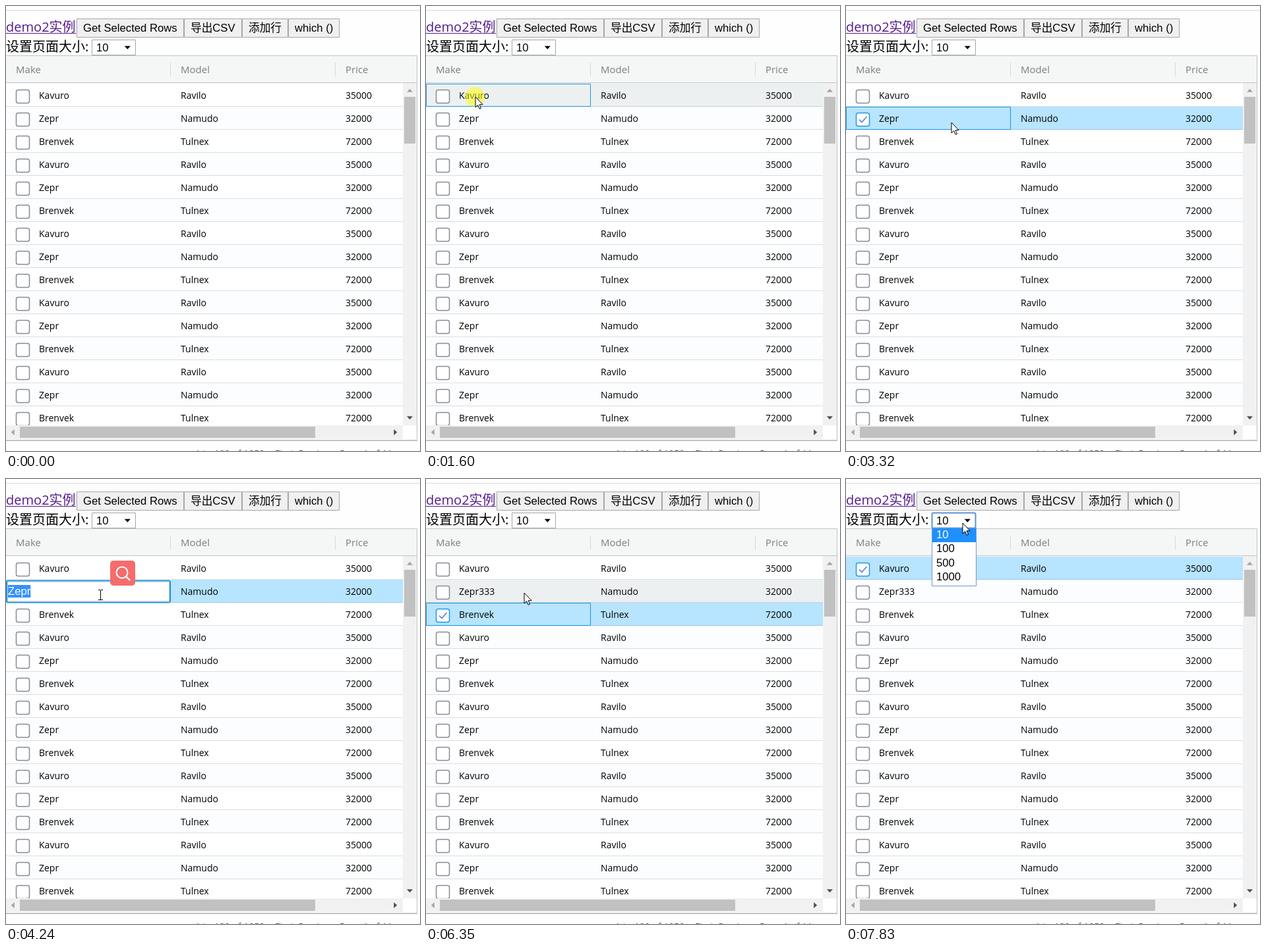
An HTML page with a canvas that plays this animation: 628x676 px, repeating every 8 s.

```html
<!DOCTYPE html>
<html lang="zh">
<head>
<meta charset="utf-8">
<title>Grid demo</title>
<style>
  html, body { margin: 0; width: 100%; height: 100%; overflow: hidden; background: #fefefe; }
  canvas { display: block; }
</style>
</head>
<body>
<canvas id="stage" width="628" height="676"></canvas>
<script>
const ctx = document.getElementById('stage').getContext('2d');
const LOOP = 8000, TICK = 77;
const TOP = 117, PITCH = 35, ROWS = 15, BODY_RIGHT = 602, BODY_BOTTOM = 637;
const GRID = '14px "Open Sans", "Noto Sans CJK SC", sans-serif';
const HEAD = '15px "Open Sans", sans-serif';
const PAGE = '20px "Open Sans", "Noto Sans CJK SC", sans-serif';
const FORM = '16.67px "Liberation Sans", "Noto Sans CJK SC", Arial, sans-serif';
const CARS = [['Kavuro', 'Ravilo', '35000'], ['Zepr', 'Namudo', '32000'], ['Brenvek', 'Tulnex', '72000']];
const COLUMNS = [50, 265, 515];
const BLUE = '#1b93dc', EDGE = '#bdc3c7', SELECTED = [183, 228, 255];
const ARROW = new Path2D('M.5.5V16.5L4.2 13L6.6 18.8L9 17.8L6.6 12.2H11.6Z');

const ENTRY = { x: 8, y: 619 };
const MOVES = [
  { from: 360, to: 1130, x: 15, y: 148, bend: 30 },
  { from: 1210, to: 1370, x: 75, y: 138 },
  { from: 1750, to: 1980, x: 81, y: 169 },
  { from: 2930, to: 3160, x: 160, y: 177 },
  { from: 4090, to: 4240, x: 144, y: 176 },
  { from: 5490, to: 5570, x: 194, y: 221 },
  { from: 6040, to: 6510, x: 119, y: 142 },
  { from: 6970, to: 7600, x: 177, y: 67, bend: 45 },
];
// a click without a row lands on the page size box
const CLICKS = [
  { down: 1600, up: 1680, row: 0 },
  { down: 2150, up: 2220, row: 1 },
  { down: 3240, up: 3320, row: 1 },
  { down: 3400, up: 3480, row: 1 },
  { down: 5660, up: 5810, row: 2 },
  { down: 6580, up: 6660, row: 0 },
  { down: 7750, up: 7830 },
];
const EDIT = { from: 3480, to: 5660 }, POPUP = { from: 3560, to: 4780 };
const DESELECT = 4700, FIRST_KEY = 5020, KEY_GAP = 190;

const clamp = (v, max) => Math.max(0, Math.min(max, v));
const lerp = (a, b, k) => a + (b - a) * k;
const within = (t, span) => t >= span.from && t < span.to;

function rect(x, y, w, h, color) {
  ctx.fillStyle = color;
  ctx.fillRect(x, y, w, h);
}
function rounded(x, y, w, h, radius, color) {
  ctx.fillStyle = color;
  ctx.beginPath();
  ctx.roundRect(x, y, w, h, radius);
  ctx.fill();
}
function frame(x, y, w, h, color, width = 1, radius = 0) {
  ctx.strokeStyle = color;
  ctx.lineWidth = width;
  ctx.beginPath();
  ctx.roundRect(x + .5, y + .5, w - 1, h - 1, radius);
  ctx.stroke();
}
function text(s, x, y, font, color = '#000') {
  ctx.font = font;
  ctx.fillStyle = color;
  ctx.fillText(s, x, y);
}
function line(points, color, width) {
  ctx.strokeStyle = color;
  ctx.lineWidth = width;
  ctx.beginPath();
  points.forEach(p => ctx.lineTo(...p));
  ctx.stroke();
}
function triangle(x, y, angle, color, size = 4.5) {
  ctx.save();
  ctx.translate(x, y);
  ctx.rotate(angle);
  ctx.fillStyle = color;
  ctx.beginPath();
  ctx.moveTo(-size, -size / 2);
  ctx.lineTo(size, -size / 2);
  ctx.lineTo(0, size / 2 + .5);
  ctx.fill();
  ctx.restore();
}

function pointerAt(t) {
  const i = MOVES.findLastIndex(m => t >= m.from);
  if (i < 0) return null;
  const start = i ? MOVES[i - 1] : ENTRY, { from, to, x, y, bend = 0 } = MOVES[i];
  const steps = Math.round((to - from) / TICK) + 1;
  const u = clamp((Math.floor((t - from) / (to - from) * (steps - 1) + 1e-6) + 1) / steps, 1);
  const k = u * u * (3 - 2 * u);
  return {
    x: Math.round(lerp(start.x, x, k) + bend * Math.sin(Math.PI * k)),
    y: Math.round(lerp(start.y, y, k)),
  };
}

function drawPage() {
  rect(0, 0, 628, 676, '#fefefe');
  rect(0, 6, 628, 1, '#dcdcdc');
  text('demo2实例', 0, 39, PAGE, '#551a8b');
  rect(0, 41, 106, 1, '#551a8b');
  text('设置页面大小:', 0, 69, PAGE);
  let x = 107;
  for (const label of ['Get Selected Rows', '导出CSV', '添加行', 'which ()']) {
    ctx.font = FORM;
    const w = Math.round(ctx.measureText(label).width + 20);
    rect(x, 19, w, 29, '#f0f0f0');
    frame(x, 19, w, 29, '#a6a6a6');
    text(label, x + 10, 39, FORM);
    x += w;
  }
  rect(0, 75, 624, 586, '#fff');
  rect(0, 75, 624, 41, '#f5f7f7');
  rect(0, 75, 624, 1, EDGE);
  rect(0, 116, 624, 1, EDGE);
  ['Make', 'Model', 'Price'].forEach((s, i) => {
    text(s, 15 + 250 * i, 102, HEAD, '#7b7f80');
    if (i) rect(250 * i - 1, 86, 1, 21, '#d5d9db');
  });
  text('1 to 100 of 1050', 287, 685, GRID, '#555');
  text('First  Previous  Page 1 of 11', 408, 685, GRID, '#555');
}

function drawScrollbars() {
  rect(602, 117, 21, 520, '#f1f1f1');
  rect(604, 138, 17, 71, '#c1c1c1');
  triangle(612.5, 128.5, Math.PI, '#a3a3a3');
  triangle(612.5, 625.5, 0, '#505050');
  rect(0, 637, 602, 21, '#f1f1f1');
  rect(21, 639, 448, 17, '#c1c1c1');
  triangle(10.5, 647.5, Math.PI / 2, '#a3a3a3');
  triangle(590.5, 647.5, -Math.PI / 2, '#505050');
  rect(0, 659, 624, 2, EDGE);
  rect(623, 75, 1, 586, EDGE);
}

function drawRows(t, pointer) {
  const [last, before] = CLICKS.filter(c => 'row' in c && t >= c.up).reverse();
  const fade = last ? clamp(.65 + (t - last.up) / 300, 1) : 1;
  const hovered = pointer ? Math.floor((pointer.y - TOP) / PITCH) : -1;
  ctx.save();
  ctx.beginPath();
  ctx.rect(0, TOP, BODY_RIGHT, BODY_BOTTOM - TOP);
  ctx.clip();
  for (let i = 0; i < ROWS; i++) {
    const y = TOP + PITCH * i, checked = last?.row === i;
    const plain = i === hovered ? [236, 240, 241] : i % 2 ? [252, 253, 254] : [255, 255, 255];
    const amount = lerp(+(before?.row === i), +checked, fade);
    rect(0, y + 1, BODY_RIGHT, PITCH, `rgb(${plain.map((v, c) => Math.round(lerp(v, SELECTED[c], amount)))})`);
    rect(0, y + PITCH, BODY_RIGHT, 1, 'rgba(0, 30, 45, .14)');

    rounded(15, y + 10, 21, 21, 3, '#fff');
    frame(15, y + 10, 21, 21, checked ? '#2196e8' : '#878b98', 1.5, 3);
    if (checked) line([[20, y + 20.5], [24, y + 24.5], [31.5, y + 16]], '#5580dc', 1.6);

    CARS[i % 3].forEach((cell, c) => {
      const edited = i === 1 && c === 0 && t >= EDIT.to;
      text(edited ? cell + '333' : cell, COLUMNS[c], y + (c ? 24 : 23.5), GRID);
    });
  }
  ctx.restore();

  const focus = CLICKS.findLast(c => t >= c.down)?.row;
  if (focus !== undefined && !within(t, EDIT)) frame(0, TOP + PITCH * focus + 1, 250, PITCH, BLUE);
}

function drawEditor(t) {
  const typed = CARS[1][0] + '3'.repeat(clamp(Math.floor((t - FIRST_KEY) / KEY_GAP) + 1, 3));
  const marked = t < DESELECT;
  rect(0, 153, 250, 35, '#fff');
  frame(.5, 154, 249, 34, BLUE, 2, 2);
  frame(2, 156, 246, 30, '#d4d8da');
  ctx.font = FORM;
  const width = ctx.measureText(typed).width;
  if (marked) rect(3, 161, width, 19, '#3390ff');
  text(typed, 3, 176, FORM, marked ? '#fff' : '#000');
  if (!marked) rect(Math.round(3 + width), 161, 1, 19, '#000');
}

function drawPopup() {
  rounded(158, 124, 38, 38, 5, '#f56c6c');
  frame(167, 133, 18, 18, '#fff', 2, 9);
  line([[182, 148], [188, 154]], '#fff', 2.4);
}

function drawSelect(t) {
  const { down, up } = CLICKS.at(-1);
  const focused = t >= down;
  rect(130, 51, 67, 24, '#fff');
  frame(130, 51, 67, 24, focused ? '#5b93d6' : '#a6a6a6', focused ? 2 : 1, focused ? 2 : 0);
  text('10', 137, 69, FORM);
  triangle(184.3, 63, 0, '#000');
  if (t < up) return;
  rect(130, 74, 68, 89, '#fff');
  rect(131, 75, 66, 21, '#1e90ff');
  frame(130, 74, 68, 89, '#6f97cc');
  ['10', '100', '500', '1000'].forEach((s, i) => text(s, 137, 90 + Math.round(21.3 * i), FORM, i ? '#000' : '#fff'));
}

function drawPointer({ x, y }, beam, pressed) {
  if (pressed) rounded(x - 16, y - 15, 30, 30, 15, 'rgba(255, 255, 0, .52)');
  if (beam) {
    rect(x - 1, y - 7, 1, 15, '#000');
    for (const end of [y - 8, y + 7]) {
      rect(x - 4, end, 3, 1, '#000');
      rect(x, end, 3, 1, '#000');
    }
    return;
  }
  ctx.save();
  ctx.translate(x - .5, y - .5);
  ctx.fillStyle = '#fff';
  ctx.fill(ARROW);
  ctx.strokeStyle = '#000';
  ctx.lineWidth = 1;
  ctx.stroke(ARROW);
  ctx.restore();
}

function draw(now) {
  const t = now % LOOP;
  const pointer = pointerAt(t);
  const editing = within(t, EDIT);
  const pressed = CLICKS.some(c => t >= c.down && t < c.up);
  drawPage();
  drawRows(t, pointer);
  drawScrollbars();
  if (editing) drawEditor(t);
  if (within(t, POPUP)) drawPopup();
  drawSelect(t);
  if (pointer) drawPointer(pointer, editing && pointer.y < 188, pressed);
  requestAnimationFrame(draw);
}
requestAnimationFrame(draw);
</script>
</body>
</html>
```
